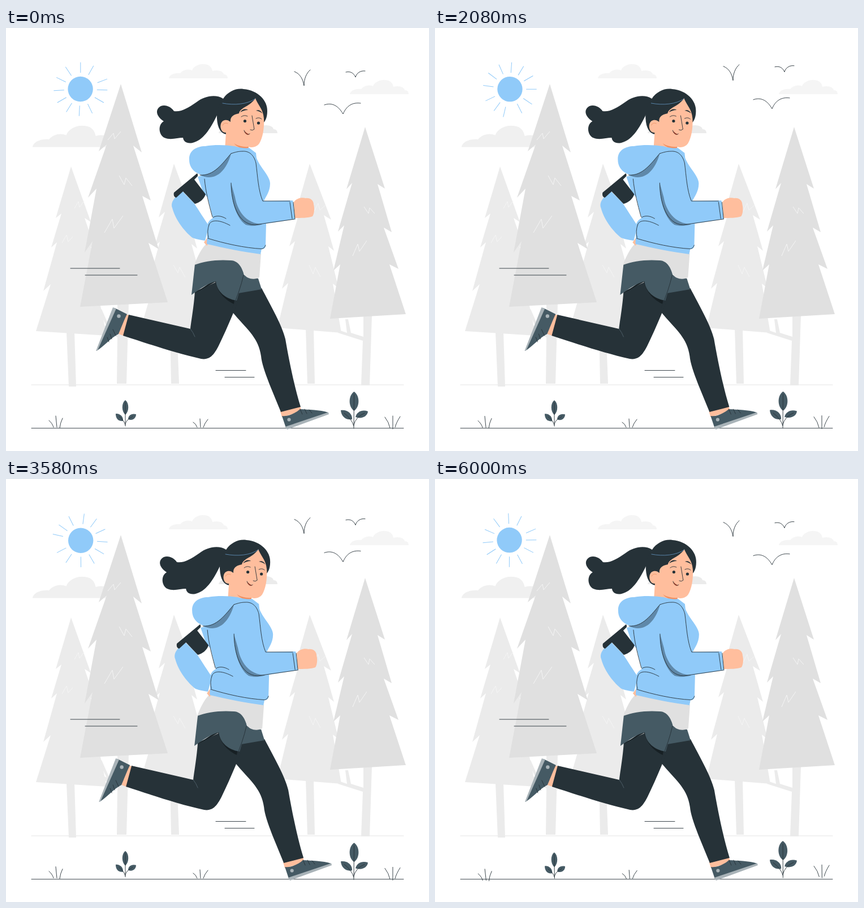
An HTML page for the animation above (6040 ms loop, 748 by 748 pixels).

```html
<!DOCTYPE html>
<html lang="en">
<head>
<meta charset="utf-8">
<title>Running in the park</title>
<style>
  html, body { margin: 0; width: 100%; height: 100%; overflow: hidden; background: #fff; }
  svg { display: block; width: 748px; height: 748px; }
  .line { fill: none; stroke: #263238; stroke-width: .9; stroke-linecap: round; stroke-linejoin: round; }
  .light { fill: #ebebeb; }
  .mid { fill: #e0e0e0; }
  .cloud { fill: #f5f5f5; }
  .bark { fill: none; stroke: #f5f5f5; stroke-width: 1; }
  .blue { fill: #90caf9; }
  .shade { fill: #5f88a9; }
  .dark { fill: #263238; }
  .slate { fill: #455a64; }
  .skin { fill: #ffbe9d; }
  .sole { fill: #a9b3b8; }
</style>
</head>
<body>
<svg viewBox="0 0 748 748">
  <defs>
    <path id="cloud" d="M0 25C1 18 12 15 20 16C25 10 34 8 41 11C44 3 55 -1 62 0C72 0 76 6 77 12C87 9 97 13 97 18C102 18 104 21 104 25Z"/>
  </defs>

  <!-- sky -->
  <g class="cloud">
    <use href="#cloud" x="288" y="64"/>
    <use href="#cloud" x="608" y="92"/>
    <use href="#cloud" transform="translate(47 173) scale(1.45 1.5)" fill="#f0f0f0"/>
    <use href="#cloud" x="376" y="161" fill="#ebebeb"/>
  </g>
  <g id="sun"><circle class="blue" cx="131.6" cy="108" r="22.2"/></g>

  <!-- trees -->
  <path class="line" style="stroke:#e3e3e3" d="M45 631H703"/>
  <g class="light">
    <path d="M107 538H121L124 634H111Z"/>
    <path d="M115 245L150 343L139 336L158 392L150 387L172 465L160 457L178 544L53 536L79 453L66 465L90 379L80 388L98 328L88 336Z"/>
    <path d="M197 488L217 487L213 629H196L197 547L165 527L167 522L178 528L164 499L169 497L184 531L197 539Z"/>
    <path d="M290 525H302L306 629H292Z"/>
    <path d="M297 240L332 335L321 328L338 390L328 382L350 462L338 454L360 535L241 522L262 450L250 458L272 378L263 386L281 325L270 335Z"/>
    <path d="M530 530H544L546 629H533Z"/>
    <path d="M537 240L575 339L562 331L580 394L570 386L588 460L578 452L593 539L480 530L499 451L488 461L511 377L501 386L519 325L510 335Z"/>
    <path d="M632 510L647 509L643 632H628L631 553L587 539L588 534L603 539L600 515H605L610 539L632 546Z"/>
  </g>
  <g class="mid">
    <path d="M203 99L240 220L225 208L256 305L241 297L270 391L252 380L286 485L131 493L153 377L139 397L160 284L145 300L178 206L164 218Z"/>
    <path d="M635 175L670 284L657 276L682 361L668 353L694 426L678 418L707 506L573 514L591 418L579 429L598 349L587 360L612 274L602 285Z"/>
  </g>
  <path class="bark" d="M121 319L128 307L130 317L138 306M99 380L107 366L110 378L118 369M180 198L190 186L192 196L203 183M200 261L209 277L212 265L223 279M174 362L188 338L191 354L207 332M296 419L304 433L307 423L317 441M536 419L543 435L547 423L556 440M545 324L552 310L555 322L564 314M633 316L641 328L643 318L652 328M613 403L622 382L625 395L638 376"/>

  <path id="birds" class="line" d="M510 77C520 81 525 90 527 102C527 90 531 80 538 74M601 78C610 76 615 80 618 87C620 80 626 75 635 76M563 136C577 131 588 138 596 152C602 138 612 131 627 133"/>
  <path class="line" d="M114 425H201M140 437H232M371 605.5H424M387 617.5H439M45 707.7H703"/>

  <!-- ground plants -->
  <g id="plants">
    <path class="line" d="M76 694Q82 699 84 706M88 686L90 706M100 690Q96 698 95 707M331 697Q336 700 338 706M343 691L344 706M357 692Q351 699 349 706M670 688Q677 697 679 707M684 686V709M697 687Q690 698 688 706"/>
    <g class="slate">
      <path d="M211 658C218 663 218 678 211 684C204 678 204 663 211 658Z"/>
      <path d="M194 682C202 681 208 688 207 695C198 696 194 690 194 682Z"/>
      <path d="M230 683C230 690 224 695 216 692C216 685 222 681 230 683Z"/>
      <path d="M615.500 643C626 650 626 670 615.500 677C605 670 605 650 615.500 643Z"/>
      <path d="M592 676C603 674 613 682 612 692C601 694 593 687 592 676Z"/>
      <path d="M640 678C639 687 629 692 618 688C620 679 630 674 640 678Z"/>
    </g>
    <path class="line" d="M211 662L211 704M200 687Q209 694 211 702M224 687Q213 692 211 700M615.500 648L615 708M598 681Q612 692 615 704M634 681Q618 688 615 702"/>
  </g>

  <g id="runner">
    <!-- front leg -->
    <path class="skin" d="M485 678L520 669L523 678L488 688Z"/>
    <path class="slate" d="M488 686C498 688 512 681 520 674C535 675 555 675 570 680L495 707Z"/>
    <path class="sole" d="M494 705L570 679.500L571 683L497 710Z"/>
    <circle class="sole" cx="500.500" cy="692.500" r="3.100"/>
    <path class="line" d="M520 674L524 683M528 674L532 682M536 675L541 681"/>
    <path class="dark" d="M397 498L410 465L452 460C466 487 488 525 494 550C500 585 510 635 521 670L486 679C475 650 453 604 451 580C446 545 424 532 397 498Z"/>

    <!-- back leg -->
    <path class="skin" d="M209 506L219 508L210 545L199 541C203 531 205 518 209 506Z"/>
    <path class="slate" d="M192 495L214 506C207 520 204 530 199 541C185 548 171 565 160 571Z"/>
    <path class="sole" d="M189 494L195 496L162 570L159 571Z"/>
    <circle class="sole" cx="199.500" cy="509.500" r="3.200"/>
    <path class="line" d="M189 533L194 544M184 541L187 550M179 547L182 555"/>
    <path class="dark" d="M334 466C332 495 327 520 326 532L217 507L207 544C250 558 300 575 345 585C363 588 370 573 376 562C388 537 399 512 410 484L372 449Z"/>
    <path class="line" style="stroke:#52636c" d="M326 532Q331 538 334 546"/>

    <!-- shorts and shirt -->
    <path class="slate" d="M418 436L446 443L452 462L411 469Z"/>
    <path d="M332 470L370 449C376 470 388 481 403 488L404 481L372 443Z" fill="#172024"/>
    <path class="slate" d="M334 418C350 409 376 407 400 410C414 414 420 428 421 437L408 482C388 479 373 466 371 448C358 451 340 463 328 472Z"/>
    <path class="line" d="M420 437Q414 464 400 496"/>
    <path class="mid" d="M355 381L451 399L448 441C439 446 427 444 421 436C417 424 412 412 398 411C375 409 350 412 333 419C338 405 346 389 355 381Z"/>

    <!-- back arm -->
    <path class="skin" d="M358 368L350 379L355 385L361 378Z"/>
    <path class="blue" d="M339 263L356 258L364 306L349 292ZM312 289C301 296 290 307 294 318C300 341 318 362 330 371C338 374 346 375 352 376L359 350C352 340 342 324 332 309Z"/>
    <path class="dark" d="M338 257Q340 259 339 262L333 268L353 294C350 303 342 309 334 311L313 289L301 300C297 299 296 295 297 291Z"/>

    <!-- head -->
    <path class="dark" d="M384 125C370 116 350 121 337 131C321 142 309 149 297 147C292 140 283 135 274 138C264 143 264 155 279 165C268 171 270 189 280 194C291 199 303 194 313 194C314 201 320 205 330 203C347 199 361 181 375 150Z"/>
    <path class="dark" d="M384 125C393 112 407 106 420 108C446 110 463 129 462 147C462 159 458 165 455 168L440 150L404 160L390 188C380 187 374 177 373 160C372 146 377 133 384 125Z"/>
    <path class="skin" d="M441 124C445 136 455 143 456 160C457 177 454 194 448 204C443 211 435 212 429 210L428 220L387 216L389 185C379 186 376 169 384 164C390 161 394 164 397 166C396 158 401 153 412 151C414 140 432 139 441 124Z"/>
    <path d="M403 204Q414 211 429 210L428 214Q411 214 403 204Z" fill="#f28f60"/>
    <path class="line" style="stroke:#5e8db5" d="M383 133C404 137 427 135 441 125"/>
    <path class="line" style="stroke:#eb996d" d="M383 172Q386 166 392 169"/>
    <path class="dark" d="M414 149C417 144 423 142 428 145C423 145 418 147 414 149ZM442 146C447 144 452 147 453 151C450 148 446 147 442 146Z"/>
    <circle class="dark" cx="422.500" cy="164.500" r="2.600"/>
    <circle class="dark" cx="446.500" cy="168" r="2.600"/>
    <path class="line" d="M416 157Q421 153 427 156M442 160Q448 157 452 161M435 155L439 179Q436 182 432 180"/>
    <path class="line" stroke-width="1.200" d="M421 181C422 187 428 190 431 187"/>
    <path d="M422 182C422 187 427 190 430 188C427 187 424 185 422 182Z" fill="#8b3b2a"/>

    <!-- hoodie -->
    <path class="skin" d="M509 308C513 301 523 299 530 301C538 300 544 305 544 312C546 319 545 329 542 333C535 336 520 336 511 336Z"/>
    <path class="blue" d="M324 233C323 217 337 209 352 209C370 206 390 207 404 209C414 212 424 213 430 212L442 221L443 230C449 246 467 262 467 275C467 290 459 298 456 306L507 305L511 338L460 346L459 386Q458 391 452 391L450 400C420 396 385 389 355 382L357 345Q360 339 366 336C359 310 354 290 350 261C335 258 324 248 324 233Z"/>
    <path class="shade" d="M343 260C368 262 383 239 398 222C391 249 372 274 343 260Z"/>
    <path class="shade" d="M398 274C398 300 405 335 424 348C433 351 445 350 454 347C423 346 409 322 405 299Z"/>
    <path class="line" d="M343 260C368 262 383 239 398 222M398 222C407 219 412 218 418 218C431 217 439 226 442 239C445 262 446 287 454 306H502M398 274C398 306 409 348 440 348L510 338M502 308L506 337M508 308L511 338M351 267C353 290 359 312 365 334M359 348C362 338 378 339 396 349M366 335C372 331 381 332 389 337M359 348Q355 359 358 371M357 372C386 381 422 389 452 390.500Q457 390 459 384"/>
  </g>
</svg>
<script>
  const byId = id => document.getElementById(id);
  const sun = byId("sun"), birds = byId("birds"), plants = byId("plants"), runner = byId("runner");
  const LOOP = 6040, FRAMES = 145, TICK = 125 / 3;

  // Sun rays: clockwise angles from the top
  const rayAngles = [0, 29, 69, 92, 120, 154, 183, 212, 240, 267, 296, 326];
  sun.insertAdjacentHTML("beforeend", rayAngles.map((a, i) => {
    const shift = i === 2 ? 3 : 0;
    return `<path d="M0 ${-29 - shift}V${-47.5 - shift}" transform="translate(131.8 108.2) rotate(${a})" stroke="#90caf9"/>`;
  }).join(""));

  // Linear interpolation through [position, value] stops
  function track(stops, p) {
    const i = stops.findIndex(s => s[0] >= p);
    if (i < 1) return stops[0][1];
    const [p0, v0] = stops[i - 1], [p1, v1] = stops[i];
    return v0 + (v1 - v0) * (p - p0) / (p1 - p0);
  }

  const shake = [0, -1, 2, -4, 4, -4, 4, -4, 2, -1, 0].map((v, i) => [i / 10, v * 1.496]);
  const float = [[0, 0], [.5, -14.96], [1, 0]];
  const sway = [[0, 0], [.25, 1], [.75, -1], [1, 0]];

  function draw(now) {
    const frame = Math.min(FRAMES - 1, Math.floor((now % LOOP + 4) / TICK));
    const t = frame / FRAMES * 6;
    const swayAngle = t < .5 ? 0 : track(sway, (t - .5) / 3 % 1);
    sun.setAttribute("transform", `rotate(${t * 60} 132 108.3)`);
    birds.setAttribute("transform", `translate(0 ${track(float, t / 3 % 1)})`);
    plants.setAttribute("transform", `rotate(${swayAngle} 387 677)`);
    runner.setAttribute("transform", `translate(${track(shake, t / 6)} 0)`);
  }

  function loop() {
    draw(performance.now());
    requestAnimationFrame(loop);
  }
  loop();
</script>
</body>
</html>
```
